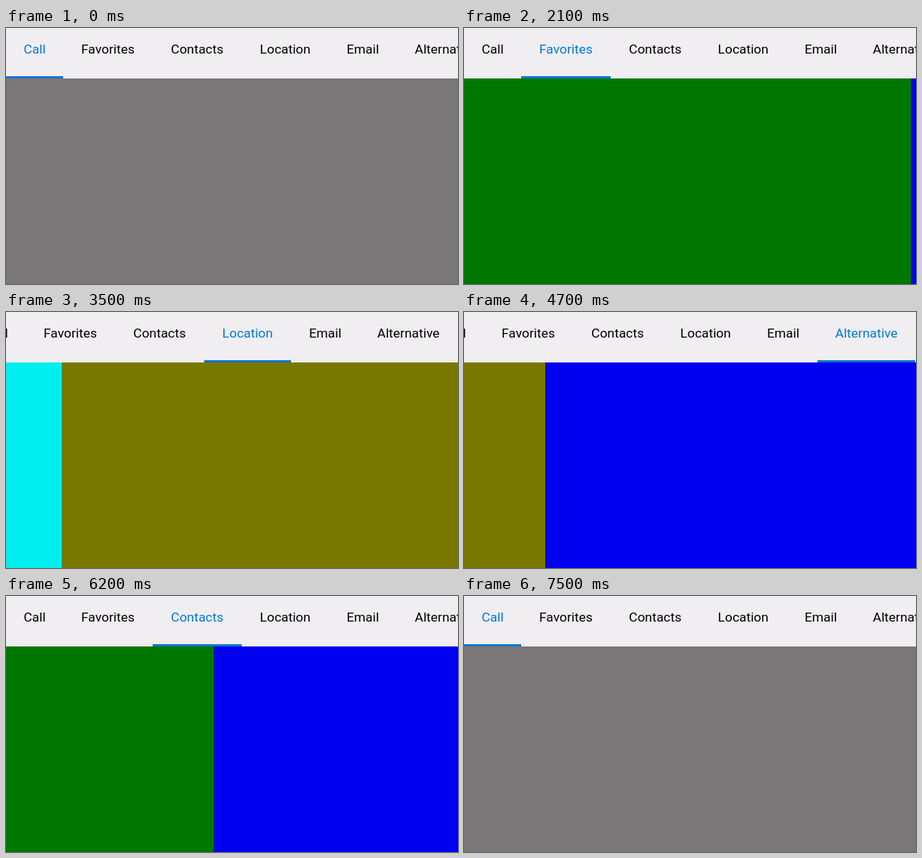
Recreate the animation shown at these times as an HTML page. Size 601x340 px, loop 7600 ms.

```html
<!DOCTYPE html>
<html lang="en">
<head>
<meta charset="utf-8">
<title>Swipeable tabs</title>
<style>
  html, body { margin: 0; width: 100%; height: 100%; overflow: hidden; background: #f0eef0; }
  svg { display: block; width: 601px; height: 340px; }
  text { font: 17.4px Roboto, sans-serif; text-anchor: middle; }
</style>
</head>
<body>
<svg id="stage" viewBox="0 0 601 340">
  <g id="pages"></g>
  <rect width="601" height="67" fill="#f0eef0"/>
  <rect width="601" height="8" fill="#eeeff1"/>
  <g id="header">
    <g id="labels"></g>
    <rect id="indicator" y="64" height="3" fill="#0f74cd"/>
  </g>
</svg>
<script>
const WIDTH = 601, LOOP = 7600, STEP = 100;
const SWIPE = 400, SLIDE = 200;
const tabs = [
  { name: 'Call', x: 0, w: 76, color: '#7a7779' },
  { name: 'Favorites', x: 76, w: 119, color: '#007800' },
  { name: 'Contacts', x: 195, w: 118.5, color: '#0000f0' },
  { name: 'Location', x: 313.5, w: 115.5, color: '#00f0f0' },
  { name: 'Email', x: 429, w: 91, color: '#787800' },
  { name: 'Alternative', x: 520, w: 130, color: '#0000f0' }
];
const forward = [1446, 2074, 2702, 3188, 3900];
const backward = [4592, 5060, 5530, 6011, 6400];
const swipes = [
  ...forward.map((start, i) => ({ start, from: i, to: i + 1 })),
  ...backward.map((start, i) => ({ start, from: 5 - i, to: 4 - i }))
];

const byId = id => document.getElementById(id);
const clamp = (v, lo, hi) => Math.min(hi, Math.max(lo, v));
const mix = (a, b, k) => a + (b - a) * k;
const smooth = v => { const k = clamp(v, 0, 1); return k * k * (3 - 2 * k); };
const scrollFor = tab => clamp(tab.x + tab.w / 2 - 300, 0, 50);

function add(parent, tag, attrs) {
  const node = document.createElementNS('http://www.w3.org/2000/svg', tag);
  for (const key in attrs) node.setAttribute(key, attrs[key]);
  return parent.appendChild(node);
}

tabs.forEach((tab, i) => {
  add(byId('pages'), 'rect', { x: i * WIDTH, y: 67, width: WIDTH, height: 273, fill: tab.color });
  tab.label = add(byId('labels'), 'text', { x: tab.x + tab.w / 2, y: 34 });
  tab.label.textContent = tab.name;
});

function draw(time) {
  let position = 0, selected = 0, previous = 0, slide = 1;
  for (const { start, from, to } of swipes) {
    if (time < start) break;
    position = mix(from, to, smooth((time - start) / SWIPE));
    // The tab bar follows only once the page has settled.
    const settled = start + SWIPE;
    if (time >= settled) {
      selected = to;
      previous = from;
      slide = smooth((time - settled) / SLIDE);
    }
  }
  const a = tabs[previous], b = tabs[selected];
  const scroll = mix(scrollFor(a), scrollFor(b), slide);
  byId('pages').setAttribute('transform', `translate(${-Math.round(position * WIDTH)} 0)`);
  byId('header').setAttribute('transform', `translate(${-scroll} 0)`);
  byId('indicator').setAttribute('x', mix(a.x, b.x, slide));
  byId('indicator').setAttribute('width', mix(a.w, b.w, slide));
  tabs.forEach((tab, i) => tab.label.setAttribute('fill', i === selected ? '#0078d7' : '#000'));
}

const begin = performance.now();
function tick() {
  const time = (performance.now() - begin) % LOOP;
  draw(Math.floor(time / STEP) * STEP);
  requestAnimationFrame(tick);
}
tick();
</script>
</body>
</html>
```
